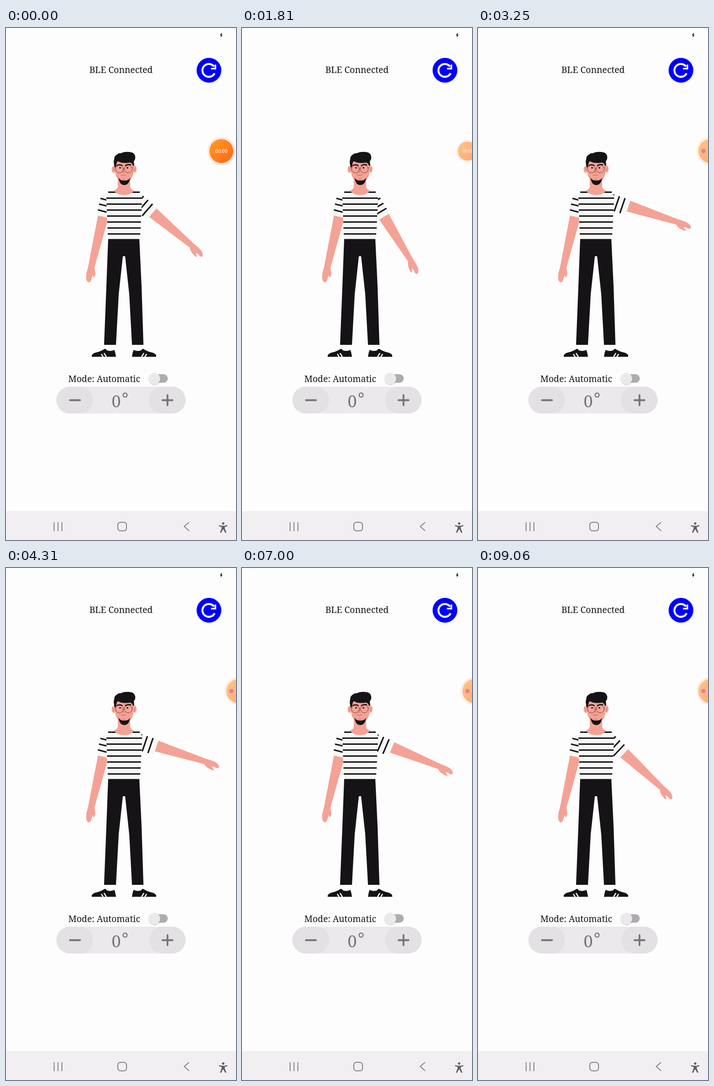
These frames come from a looping animation (502x1115 px, 9.12 s). An HTML page:

```html
<!DOCTYPE html>
<html lang="en">
<head>
<meta charset="utf-8">
<title>Arm angle monitor</title>
<style>
  html, body { margin: 0; width: 100%; height: 100%; overflow: hidden; background: #fefdfe; }
  svg { display: block; width: 502px; height: 1115px; }
  .label { font: 19.3px "Noto Serif", serif; fill: #141214; text-anchor: middle; }
  .value { font: 36px "Noto Serif", serif; fill: #777577; }
  .timer { font: 10.8px Roboto, sans-serif; fill: #fff; text-anchor: middle; }
  .skin { fill: #f4a295; }
  .ink { fill: #151315; }
  .cloth { fill: #f6f8f5; }
  .line { fill: none; stroke-linecap: round; stroke-linejoin: round; }
  .stripe { fill: none; stroke: #151315; stroke-width: 3.2; }
</style>
</head>
<body>
<svg viewBox="0 0 502 1115">
  <defs>
    <linearGradient id="orange" x1="0" y1="0" x2="1" y2="1">
      <stop offset="0" stop-color="#ff9f24"/>
      <stop offset="1" stop-color="#ff641b"/>
    </linearGradient>
    <filter id="shadow" x="-30%" y="-30%" width="160%" height="160%">
      <feDropShadow dx="0" dy="1" stdDeviation="1" flood-opacity=".28"/>
    </filter>
    <g id="shoe">
      <path class="ink" d="M187 716Q186 710 195 707Q208 704 215 699Q218 698 220 702Q229 705 236 701Q238 702 240 716Z"/>
      <path d="M208 710l4 6M214 708l5 8" stroke="#fff" stroke-width="2.4"/>
    </g>
  </defs>

  <!-- header -->
  <path d="M470 11l-3.2 5.6h2.6l-1 4.4 4.4-6h-2.6l1.6-4z" fill="#222"/>
  <text class="label" x="251" y="98">BLE Connected</text>
  <circle cx="443" cy="92" r="27" fill="#00f"/>
  <path d="M455.3 98.5A14 14 0 1 1 454 84" fill="none" stroke="#fff" stroke-width="4.2"/>
  <path d="M457 79.5V88.5H447.5" fill="none" stroke="#fff" stroke-width="3.4"/>

  <!-- resting arm -->
  <path class="skin" d="M201 407L179 521Q174 537 175 546Q177 554 181 554Q186 552 187 545L189 538L191 543Q195 541 195 534L193 522L221 422V409Z"/>
  <path class="cloth" d="M224 358Q209 361 206 371L199 408L221 413L224 380Z"/>
  <path class="stripe" d="M206 371l15 4M203 383.500l17 4M200.500 396l19 5"/>

  <!-- moving arm, laid out along the x axis from the shoulder -->
  <g id="arm">
    <path class="skin" d="M38-12.500L154-8Q168-9 177-7.500Q187-4 187 1Q186 5 177 3L171 4L178.500 9Q178 12 167 10Q159 9 154 4L38 12.500Z"/>
    <path class="cloth" d="M-4-14L40-14Q43-14 43-11V17Q43 20 40 20L-4 22Z"/>
    <path class="stripe" d="M4-14V21M17-14V21M30-14V20.500"/>
  </g>

  <!-- body -->
  <path class="cloth" d="M238 356L224 358Q219 361 219 370L222 460H292L297 370Q297 361 290 358L276 356Z"/>
  <path class="stripe" d="M223 357.500H242M273 357.500H292M219 370.500H297M219.500 383.500H296.500M220 396.500H296M220.500 409.500H295M221 422.500H294.500M221.500 435.500H294M222 448.500H293"/>
  <path class="ink" d="M223 459.500H291L296 565L300 690H275L269 580L260 497H255L246 580L240 690H214L219 565Z"/>
  <use href="#shoe"/>
  <use href="#shoe" transform="translate(515) scale(-1 1)"/>

  <!-- head -->
  <path class="skin" d="M244 326V346Q243 352 235 354Q243 364 258 364Q272 364 280 354Q272 352 271 346V326Z"/>
  <ellipse class="skin" cx="235" cy="308" rx="4.500" ry="7.500"/>
  <ellipse class="skin" cx="281" cy="307.500" rx="4" ry="7.500"/>
  <path d="M233 304q4 2 3 7M283 304q-3 2-3 7" class="line" stroke="#b9665c" stroke-width=".8"/>
  <path class="skin" d="M238 288H279V312Q277 326 270 333Q258 341 247 333Q239 326 238 312Z"/>
  <path class="ink" d="M237 303Q234 291 236 287Q236 278 243 275Q246 272 250 273Q257 269 270 270Q281 271 282 280Q283 286 279 290L280 300H277Q276 294 270 293Q254 296 244 290Q241 292 240 303Z"/>
  <path class="ink" d="M245.500 326Q248 342 258 342Q269 342 271 326Q267 333 258 332Q250 333 245.500 326Z"/>
  <path d="M242.500 299.500Q248 296.500 253 299.500M261 299.500Q266 296.500 272 298" class="line" stroke="#151315" stroke-width="2.800"/>
  <circle class="ink" cx="249" cy="304.500" r="1.800"/>
  <circle class="ink" cx="265" cy="304.500" r="1.800"/>
  <g class="line" stroke="#70423f" stroke-width="1">
    <circle cx="247.500" cy="307" r="8.500"/>
    <circle cx="267" cy="307" r="8.500"/>
    <path d="M256 306q1.500-1 2.500 0M239 305l-2-1M275.500 305l2-1"/>
  </g>
  <path d="M257 308L254.500 314H258M251 320Q257 322 262 319.500M255 329H260" class="line" stroke="#a95b50" stroke-width="1"/>

  <!-- mode switch -->
  <text class="label" x="214.500" y="770.500">Mode: Automatic</text>
  <rect x="315" y="754" width="38" height="18.500" rx="9.250" fill="#aeacae"/>
  <circle cx="324" cy="763.500" r="12.500" fill="#ebe9eb" filter="url(#shadow)"/>

  <!-- stepper -->
  <rect x="110" y="781" width="282" height="58.500" rx="29.250" fill="#ebe9eb"/>
  <rect x="110" y="781" width="80" height="58.500" rx="29.250" fill="#e3e1e3"/>
  <rect x="312" y="781" width="80" height="58.500" rx="29.250" fill="#e3e1e3"/>
  <path d="M139.500 810.500H161.500M341.500 810.500H363.500M352.500 799.500V821.500" class="line" stroke="#747274" stroke-width="3.800"/>
  <text class="value" x="230.500" y="826">0<tspan dx="2" dy="-5">°</tspan></text>

  <!-- navigation bar -->
  <rect y="1052" width="502" height="63" fill="#f1eff2"/>
  <g class="line" stroke="#858388" stroke-width="2">
    <path d="M105 1077V1095M113.500 1077V1095M122 1077V1095"/>
    <rect x="244" y="1076.500" width="19" height="18.500" rx="5.500"/>
    <path d="M399 1077L389 1085.500L399 1094.500"/>
  </g>
  <g fill="#605e62">
    <circle cx="474" cy="1079" r="2.600"/>
    <path d="M465 1082.500L471 1084H477L483 1082.500V1085L477.500 1086.500V1090L481 1098.500L478.500 1099.500L474.500 1092H473.500L469.500 1099.500L467 1098.500L470.500 1090V1086.500L465 1085Z"/>
  </g>

  <!-- recorder badge -->
  <g id="badge">
    <circle r="30.500" fill="#ffe3da"/>
    <circle r="26" fill="url(#orange)"/>
    <text class="timer" id="timer" y="4"></text>
    <circle id="dot" cx="-15" r="4.800" fill="#c62a3c"/>
  </g>
</svg>
<script>
  const LOOP = 9120, DOCKED = 2000;
  const $ = id => document.getElementById(id);
  const arm = $('arm'), badge = $('badge'), timer = $('timer'), dot = $('dot');

  // [ms, degrees below horizontal]
  const armKeys = [
    [0, 41.1], [400, 47], [1000, 56], [1810, 59.5], [2250, 59.5], [2880, 47],
    [3250, 19], [3800, 17.2], [4310, 18.6], [4750, 20], [5350, 25.5],
    [5940, 25.3], [6560, 22], [7000, 23], [7560, 18], [7940, 15.5],
    [8440, 31], [8900, 44], [9060, 43.5]
  ];
  // [ms, x, scale, opacity]
  const badgeKeys = [
    [0, 470, 1, 1], [1450, 470, 1, 1], [1810, 492, 0.8, 0.57],
    [DOCKED, 492, 0.8, 0.57], [2200, 507, 1, 0.57]
  ];

  function sample(keys, t) {
    const i = keys.findIndex(k => k[0] > t);
    if (i < 0) return keys[keys.length - 1].slice(1);
    const a = keys[i - 1], b = keys[i];
    const u = (t - a[0]) / (b[0] - a[0]);
    const ease = u * u * (3 - 2 * u);
    return a.slice(1).map((v, n) => v + (b[n + 1] - v) * ease);
  }

  function draw(t) {
    const [angle] = sample(armKeys, t);
    arm.setAttribute('transform', `translate(288 374) rotate(${angle})`);

    const [x, scale, opacity] = sample(badgeKeys, t);
    badge.setAttribute('transform', `translate(${x} 268) scale(${scale})`);
    badge.setAttribute('opacity', opacity);
    timer.textContent = t < DOCKED ? '00:0' + Math.floor(t / 600) : '';
    dot.setAttribute('visibility', t < DOCKED ? 'hidden' : 'visible');
  }

  const start = performance.now();
  function tick() {
    draw((performance.now() - start) % LOOP);
    requestAnimationFrame(tick);
  }
  tick();
</script>
</body>
</html>
```
